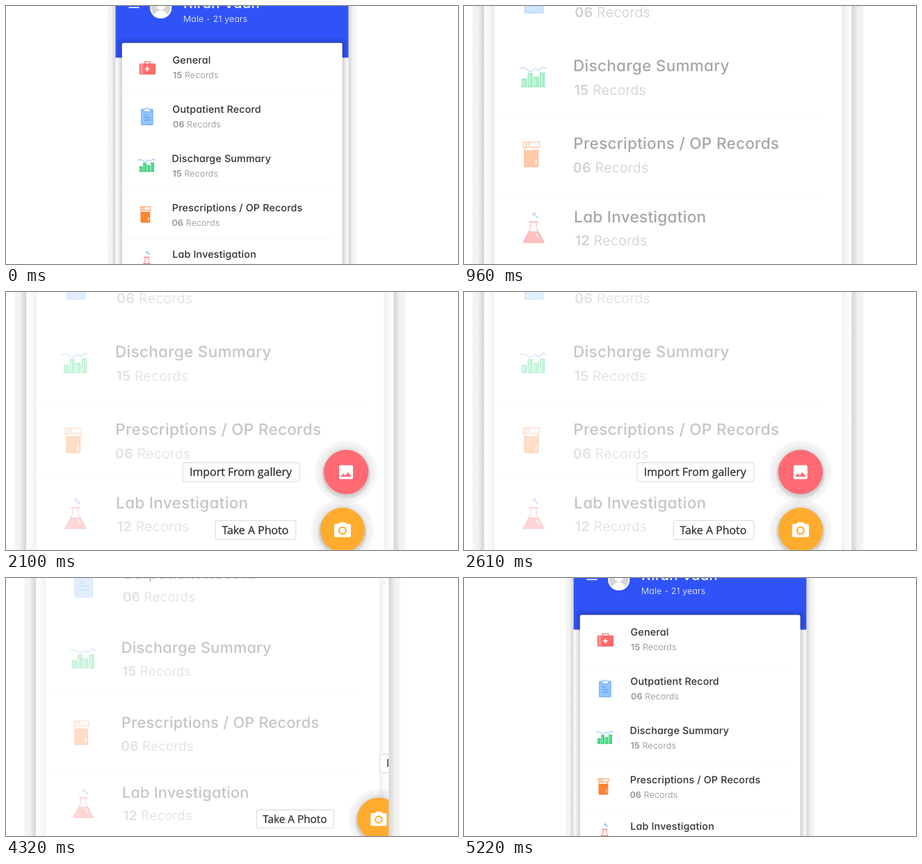
Write an HTML page that moves like this. It is 650x372 px and loops after 5880 ms.

```html
<!DOCTYPE html>
<html lang="en">
<head>
<meta charset="utf-8">
<title>Health records</title>
<style>
  html, body { margin: 0; width: 100%; height: 100%; overflow: hidden; background: #fff; }
  svg { display: block; width: 650px; height: 372px; }
  text { font-family: Inter, Roboto, sans-serif; font-feature-settings: "cv11"; text-rendering: geometricPrecision; }
  .title { font-size: 14.3px; font-weight: 500; letter-spacing: .17px; fill: #303033; }
  .sub { font-size: 12.5px; font-weight: 300; letter-spacing: .15px; fill: #8a8a8a; }
  .sub tspan { font-weight: 600; fill: #959595; }
  .name { font-size: 20px; font-weight: 500; letter-spacing: .4px; fill: #fff; }
  .info { font-size: 12.4px; font-weight: 300; letter-spacing: .2px; fill: #fff; }
  .label { font: 500 10.1px "Open Sans", "Noto Sans", sans-serif; fill: #2d2d2d; stroke: #2d2d2d; stroke-width: .18; }
</style>
</head>
<body>
<svg viewBox="0 0 650 372">
  <defs>
    <linearGradient id="edge">
      <stop offset="0" stop-color="#f6f6f6"/>
      <stop offset=".5" stop-color="#f1f1f1"/>
      <stop offset=".62" stop-color="#e6e6e6"/>
      <stop offset="1" stop-color="#d3d3d3"/>
    </linearGradient>
    <radialGradient id="halo">
      <stop offset=".66" stop-color="#000" stop-opacity=".17"/>
      <stop offset=".8" stop-color="#000" stop-opacity=".07"/>
      <stop offset="1" stop-color="#000" stop-opacity=".025"/>
    </radialGradient>
    <clipPath id="screen"><rect x="157.6" y="-20" width="334.8" height="460"/></clipPath>
    <clipPath id="face"><circle cx="222.7" cy="2.5" r="14"/></clipPath>
  </defs>

  <g id="scene">
    <rect x="146.5" y="-20" width="11.5" height="460" fill="url(#edge)"/>
    <rect x="146.5" y="-20" width="11.5" height="460" fill="url(#edge)" transform="matrix(-1 0 0 1 650 0)"/>

    <g clip-path="url(#screen)">
      <rect x="157" y="-20" width="336" height="460" fill="#fefefe"/>
      <rect x="157" y="-20" width="336" height="94.5" fill="#3053f8"/>

      <path d="M176.5 2.2h15M176.5 -3h15" stroke="#fff" stroke-width="1.6"/>
      <circle cx="222.7" cy="2.5" r="15.6" fill="#fff"/>
      <g clip-path="url(#face)">
        <circle cx="222.7" cy="2.5" r="14" fill="#d6d6d6"/>
        <circle cx="222.7" cy="-1" r="6.5" fill="#fff"/>
        <ellipse cx="222.7" cy="15" rx="9.5" ry="9" fill="#fff"/>
      </g>
      <text class="name" x="255" y="2.5">Kiran Vadh</text>
      <text class="info" x="255" y="23.3">Male - 21 years</text>

      <g id="shade" fill="none" stroke="#000" stroke-opacity=".036"></g>
      <rect x="166.8" y="53.3" width="316.8" height="400" rx="2" fill="#fff"/>
      <path d="M167 124.4h300M167 265.4h300M167 336.4h300" stroke="#f8f8f8"/>
      <g id="rows"></g>

      <!-- briefcase -->
      <g stroke="#f0585c" stroke-width=".8" fill="#ff6b6b">
        <path d="M199.3 83.5v-3.2h8v3.2" fill="none" stroke-width="1.1"/>
        <rect x="192.2" y="83.3" width="22.4" height="15" rx=".8"/>
        <path d="M194.3 83.5v14.6M196.2 83.5v14.6" stroke="#ffd0d0"/>
        <path d="M203.2 87.6v6.4M200 90.8h6.4" stroke="#fff" stroke-width="2"/>
      </g>

      <!-- clipboard -->
      <g stroke="#5a9df0" stroke-width=".8" fill="#92c5ff">
        <rect x="194.6" y="149" width="16.6" height="22.4" rx=".6"/>
        <path d="M198.3 152.3v-3.4h2.8v-1.6h3.8v1.6h2.8v3.4z" fill="#fff"/>
        <path d="M198.4 157.3h5M198.4 160.9h9.4M198.4 164.5h9.4" stroke="#3f86e0"/>
      </g>

      <g transform="translate(129 153.1) scale(.6605)">
        <!-- chart -->
        <path d="M92 104.6l7-1 8 5.6 7-5 4 3.4 6-4.8 6 1.6" fill="none" stroke="#6ba8f2" stroke-width="1.3"/>
        <g id="bars" fill="#35da7d" stroke="#18c565"></g>

        <!-- pill jar -->
        <g stroke="#fa7a2c" stroke-width="1.1" fill="#ff8433">
          <rect x="98.6" y="213.5" width="19" height="26.9" rx="1" fill="#fff"/>
          <path d="M98.6 218h19v21.4q0 1-1 1h-17q-1 0-1-1z"/>
          <rect x="97" y="206.4" width="22.4" height="7.1" fill="#fff"/>
          <path d="M101 207v5M105 207v5" stroke-width="1.5"/>
          <path d="M114.8 230v5.6q0 1.4-2 1.4" stroke="#fff" stroke-width="1.4" fill="none"/>
        </g>

        <!-- flask -->
        <g stroke="#ee5a5e" stroke-width="1.1" fill="#ff6b6b">
          <path d="M107.4 317v8L97 345.4h28.6L115 325v-8" fill="#fff"/>
          <path d="M104.6 330.5h13.4l7.6 14.9H97z"/>
          <path d="M105 316.8h12.4" stroke-width="1.6"/>
          <path d="M114.6 333l3.4 6" stroke="#fff" stroke-width="1.5"/>
        </g>
        <g fill="#a5d0ff" stroke="#5aa0f2"><circle cx="112.2" cy="306.4" r="1.9"/><circle cx="116" cy="310" r="1.2"/></g>
      </g>

      <g id="fab">
        <circle cx="445.5" cy="418.5" r="27" fill="#e9e9e9"/>
        <circle cx="445.5" cy="418.5" r="23.4" fill="#dedede"/>
      </g>
      <rect id="veil" x="157" y="-20" width="336" height="460" fill="#fff"/>

      <g id="photo">
        <circle cx="445.9" cy="382.6" r="28.6" fill="url(#halo)"/>
        <circle cx="445.9" cy="385" r="22" fill="#000" fill-opacity=".08"/>
        <circle cx="445.9" cy="382.6" r="20.3" fill="#ffac2e"/>
        <g transform="translate(436.8 374) scale(.76)">
          <path fill="#fff" fill-rule="evenodd" d="M9 2L7.17 4H4c-1.1 0-2 .9-2 2v12c0 1.1.9 2 2 2h16c1.1 0 2-.9 2-2V6c0-1.1-.9-2-2-2h-3.17L15 2zM12 7a5 5 0 1 0 .01 0z"/>
          <circle cx="12" cy="12" r="3.2" fill="#fff"/>
        </g>
        <rect x="330" y="374" width="73.4" height="17.3" rx="2" fill="#fff" stroke="#dadada" stroke-width=".7"/>
        <text class="label" x="335.9" y="386.3">Take A Photo</text>
      </g>

      <g id="gallery">
        <circle cx="445.9" cy="329.6" r="28.6" fill="url(#halo)"/>
        <circle cx="445.9" cy="332" r="22" fill="#000" fill-opacity=".08"/>
        <circle cx="445.9" cy="329.6" r="20.3" fill="#ff6a74"/>
        <path transform="translate(437.4 321.3) scale(.705)" fill="#fff" fill-rule="evenodd" d="M21 19V5c0-1.1-.9-2-2-2H5c-1.1 0-2 .9-2 2v14c0 1.1.9 2 2 2h14c1.1 0 2-.9 2-2zM8.5 13.5l2.5 3 3.5-4.5 4.5 6H5z"/>
        <rect x="297" y="321.1" width="106.4" height="17.3" rx="2" fill="#fff" stroke="#dadada" stroke-width=".7"/>
        <text class="label" x="303.2" y="332.9">Import From gallery</text>
      </g>
    </g>
  </g>
</svg>

<script>
const LOOP = 5880, STEP = 30;
const PIVOT_X = 380, PIVOT_Y = 451, ZOOM = 0.577;
const VEIL = 0.72, SLIDE = 210;
const $ = id => document.getElementById(id);

// title, count, title x, count x, title baseline, count baseline
const rows = [
  ['General', '15', 239.5, 240, 82.7, 104.4],
  ['Outpatient Record', '06', 239.3, 240, 153.7, 175.4],
  ['Discharge Summary', '15', 238.6, 239.5, 224.7, 246.4],
  ['Prescriptions / OP Records', '06', 238.8, 238.4, 295.7, 317.4],
  ['Lab Investigation', '12', 239.3, 240.3, 362.7, 383.9]
];
$('rows').innerHTML = rows.map(([title, count, x, cx, y, cy]) =>
  `<text class="title" x="${x}" y="${y}">${title}</text>` +
  `<text class="sub" x="${cx}" y="${cy}"><tspan>${count}</tspan> Records</text>`).join('');

$('bars').innerHTML = [[95.5, 119], [103.6, 111.5], [112, 116.5], [120.4, 110.5]].map(([x, y]) =>
  `<rect x="${x}" y="${y}" width="6" height="${130 - y}"/>` +
  `<path d="M${x + 1.8} ${y + 2}V128" stroke="#b6f5d2" stroke-width="1.2"/>`).join('');

$('shade').innerHTML = [1.5, 3, 5, 8, 12, 16].map(w =>
  `<rect x="166.8" y="53.3" width="316.8" height="400" rx="2" stroke-width="${w}"/>`).join('');

const span = (t, from, to) => Math.min(1, Math.max(0, (t - from) / (to - from)));
const smooth = p => p * p * (3 - 2 * p);
const ramp = (t, from, to) => smooth(span(t, from, to));

// Offset to the right: eases in from the edge, later speeds back out
function slide(t, inStart, outStart) {
  const arrive = 1 - span(t, inStart, inStart + 940);
  const leave = span(t, outStart, outStart + 800);
  return SLIDE * (arrive ** 3 + leave ** 2);
}

function draw(t) {
  const s = 1 + ZOOM * (ramp(t, 10, 600) - ramp(t, 4220, 4710));
  $('scene').setAttribute('transform',
    `matrix(${s} 0 0 ${s} ${PIVOT_X * (1 - s)} ${PIVOT_Y * (1 - s)})`);
  $('veil').setAttribute('opacity', VEIL * (ramp(t, 420, 1180) - ramp(t, 4745, 5220)));
  $('fab').setAttribute('opacity', t < 2000 ? 1 - ramp(t, 450, 600) : 0);
  $('photo').setAttribute('transform', `translate(${slide(t, 1160, 3984)} 0)`);
  $('gallery').setAttribute('transform', `translate(${slide(t, 1395, 3565)} 0)`);
}

const start = performance.now();
function tick() {
  const t = (performance.now() - start) % LOOP;
  draw(Math.floor(t / STEP) * STEP);
  requestAnimationFrame(tick);
}
draw(0);
requestAnimationFrame(tick);
</script>
</body>
</html>
```
